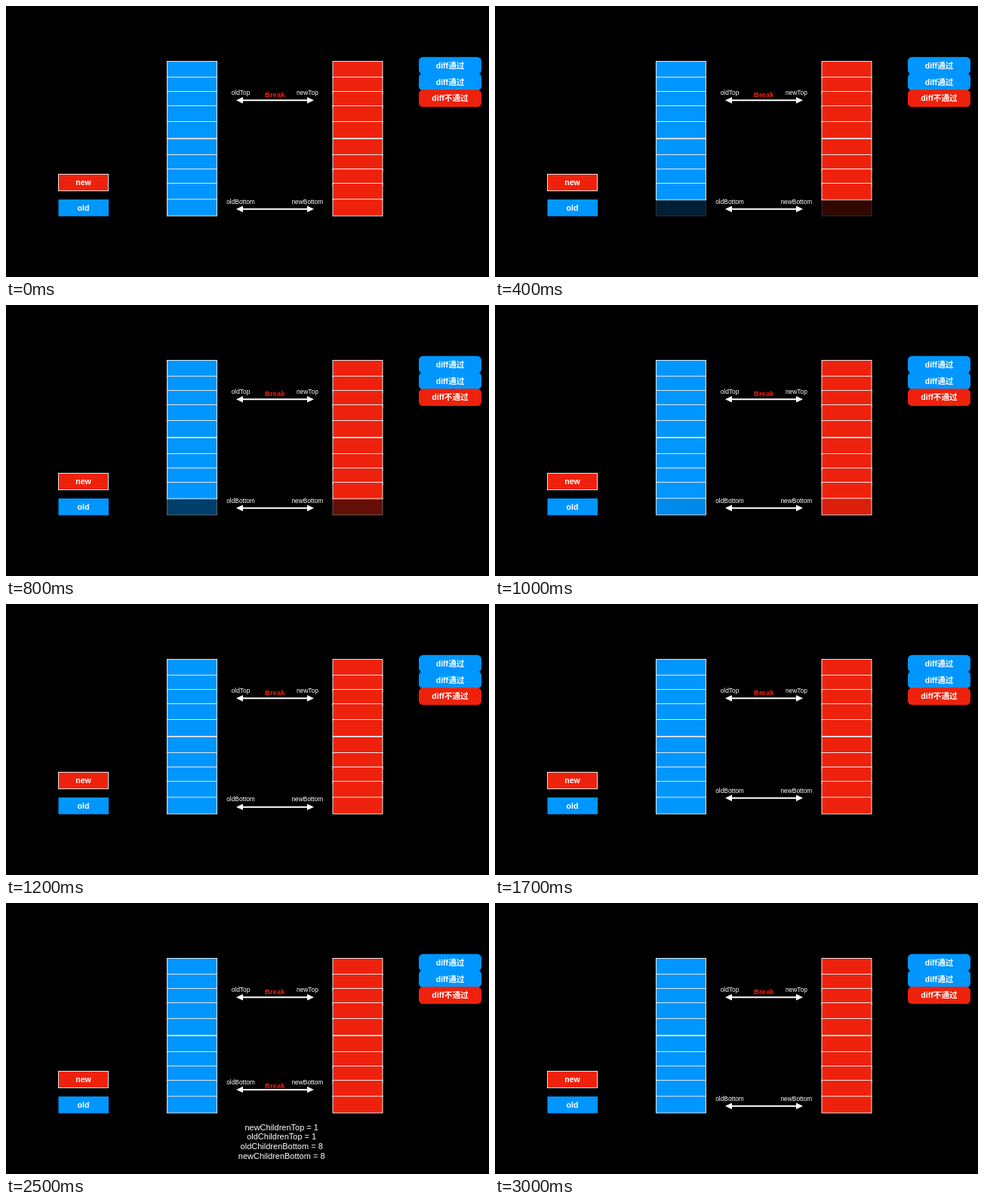
An HTML page that plays this animation: 640 by 360 pixels, repeating every 3.1 s.

```html
<!DOCTYPE html>
<html lang="zh">
<head>
<meta charset="utf-8">
<title>Children diff</title>
<style>
  html, body { margin: 0; width: 100%; height: 100%; overflow: hidden; background: #000; }
  svg { display: block; width: 100%; height: 100%; }
  text { fill: #fff; text-anchor: middle; font-family: "Liberation Sans", "Noto Sans CJK SC", "Noto Sans CJK", sans-serif; }
  .label { font-size: 8.4px; }
  .info { font-size: 11px; }
  .bold { font-size: 10.6px; font-weight: bold; }
  .break { font-size: 9.6px; font-weight: bold; fill: #ee220c; }
  .old { fill: #0096ff; }
  .new { fill: #ee220c; }
  .cell { stroke: #e4e8ec; stroke-width: 1; }
  .arrow { fill: #fff; stroke: none; }
</style>
</head>
<body>
<svg id="stage" viewBox="0 0 640 360"></svg>
<script>
const LOOP = 3100, STEP = 100;
const BLINK = { start: 22, length: 1075 };
const MOVE = { start: 1170, length: 1000, distance: -21.8 };
const RESULT_START = 2200, RESULT_END = 3000;
const cellTops = [73.5, 94.5, 113.5, 132.5, 153.5, 176.5, 197.5, 216.5, 235.5, 256.7];

const text = (x, y, kind, value) => `<text x="${x}" y="${y}" class="${kind}">${value}</text>`;

const rect = (x, y, w, h, kind, extra = "") =>
  `<rect x="${x}" y="${y}" width="${w}" height="${h}" class="${kind}" ${extra}/>`;

const column = (x, kind) => cellTops.map((y, i) =>
  rect(x, y, 66, 22.2, `${kind} cell${i === cellTops.length - 1 ? " last" : ""}`)).join("");

const pill = (y, kind, value) =>
  rect(547, y, 83, 22.7, kind, 'rx="5.5"') + text(588.5, y + 15, "bold", value);

const pointer = (y, end) =>
  `<path class="arrow" d="M305 ${y}l9 -4.2v3.2h85v-3.2l9 4.2l-9 4.2v-3.2h-85v3.2z"/>` +
  text(311, y - 7.2, "label", "old" + end) + text(399.4, y - 7.2, "label", "new" + end);

const results = ["newChildrenTop = 1", "oldChildrenTop = 1", "oldChildrenBottom = 8", "newChildrenBottom = 8"];

const stage = document.getElementById("stage");
stage.innerHTML =
  rect(69.5, 223.5, 66, 22, "new cell") + text(102.5, 238, "bold", "new") +
  rect(69.5, 257, 66.5, 22.3, "old") + text(102.5, 272, "bold", "old") +
  column(213.5, "old") + column(433, "new") +
  pill(67.8, "old", "diff通过") + pill(89.5, "old", "diff通过") + pill(111.3, "new", "diff不通过") +
  pointer(125.2, "Top") + text(356.3, 120.6, "break", "Break") +
  `<g id="bottom">${pointer(269.7, "Bottom")}</g>` +
  `<g id="result">${text(356.3, 245.8, "break", "Break")}` +
  results.map((line, i) => text(365.2, 301.6 + i * 12.75, "info", line)).join("") + "</g>";

const lastCells = stage.querySelectorAll(".last");
const bottom = document.getElementById("bottom");
const result = document.getElementById("result");

const progress = (t, { start, length }) => Math.min(1, Math.max(0, (t - start) / length));
const ease = p => (1 - Math.cos(Math.PI * p)) / 2;

function draw(now) {
  const frameTime = Math.floor((now % LOOP) / STEP) * STEP;
  const t = frameTime >= RESULT_END ? 0 : frameTime;
  const opacity = Math.cos(Math.PI * progress(t, BLINK)) ** 2;
  lastCells.forEach(cell => cell.setAttribute("opacity", opacity));
  bottom.setAttribute("transform", `translate(0 ${MOVE.distance * ease(progress(t, MOVE))})`);
  result.setAttribute("visibility", t >= RESULT_START ? "visible" : "hidden");
}

function tick() {
  draw(performance.now());
  requestAnimationFrame(tick);
}
tick();
</script>
</body>
</html>
```
